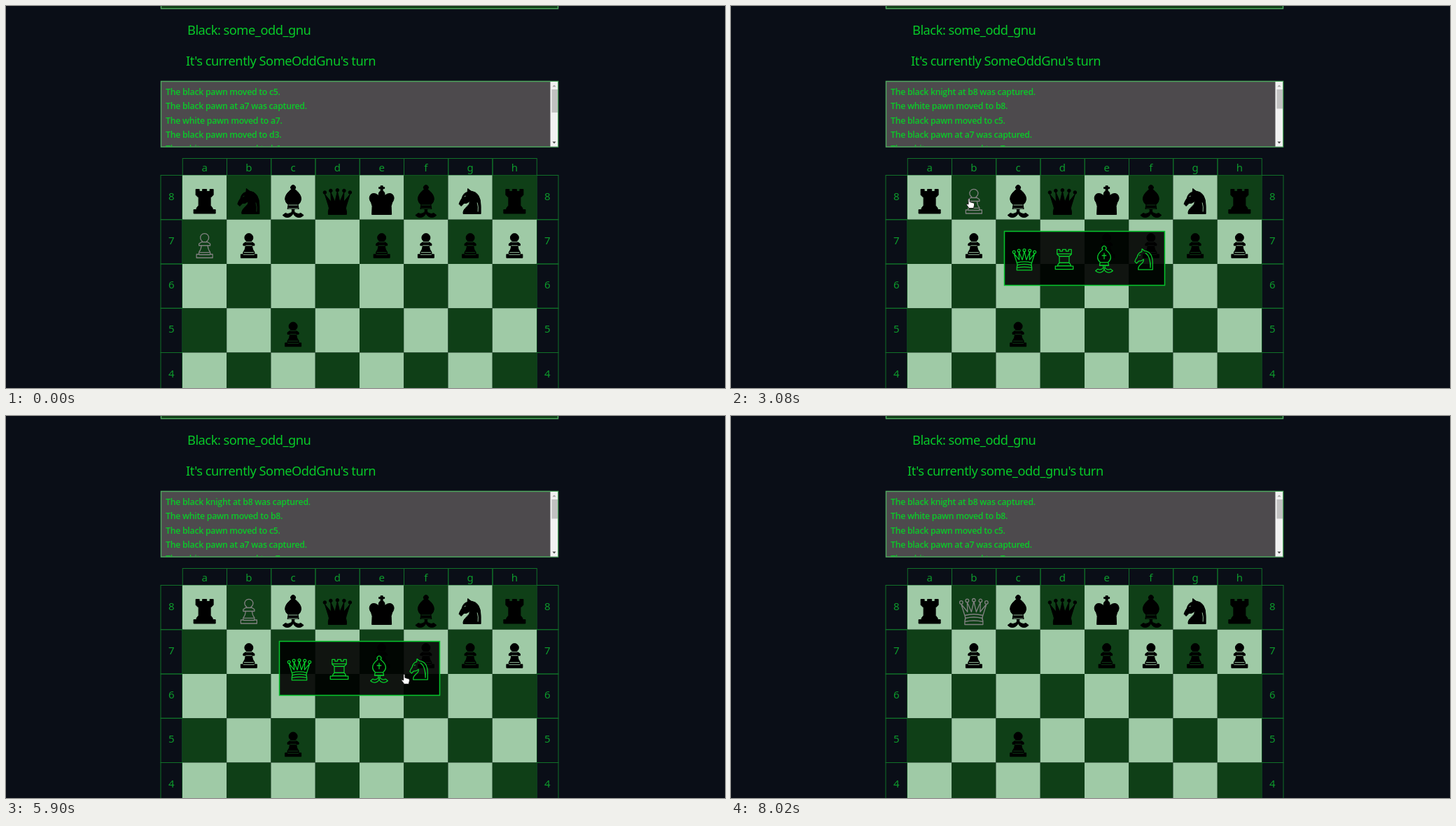
An HTML page for the animation above (8880 ms loop, 1027 px wide and 545 px high).

```html
<!DOCTYPE html>
<html lang="en">
<head>
<meta charset="utf-8">
<title>Pawn promotion</title>
<style>
html, body { margin: 0; width: 100%; height: 100%; overflow: hidden; background: #0a0e17; }
svg { display: block; }
text { font-family: "Noto Sans", "Open Sans", sans-serif; }
.title { font-size: 18.3px; letter-spacing: -.5px; fill: #08c928; }
.log { font: 600 12.3px "Open Sans", "Noto Sans", sans-serif; letter-spacing: -.27px; fill: #0acb28; }
.label { font-size: 15px; fill: #0d9a2c; text-anchor: middle; }
.cell { fill: none; stroke: #117029; }
.outline { fill: none; stroke-linejoin: round; }
.solid { stroke: #000; stroke-width: 1; stroke-linejoin: round; }
.cut { fill: none; stroke-width: .9; }
.cursor { fill: #fff; stroke: #111; stroke-width: .9; stroke-linejoin: round; }
</style>
</head>
<body>
<svg id="stage" width="1027" height="545" viewBox="0 0 1027 545"></svg>
<script>
const LOOP = 8880, SELECT = 1740, CAPTURE = 3080, PROMOTE = 6840;
const LEFT = 252, TOP = 241.5, SIZE = 63.25;
const LIGHT = "#9fcaa6", DARK = "#0f3f17";

// Each piece: silhouette, inner lines, extra lines for the outlined style.
// Origin: middle of the square's top edge.
const ball = (x, y) => `M${x - 2.3} ${y}a2.3 2.3 0 1 1 4.6 0a2.3 2.3 0 1 1 -4.6 0`;
const PIECES = {
  p: ["M-3 31A6 6 0 1 1 3 31L8 34.5V37H4.5Q5 43 8 46.5V49.5H11.5V54.5H-11.5V49.5H-8V46.5Q-5 43 -4.5 37H-8V34.5Z",
    "M-4.5 32H4.5M-4.5 37H4.5M-7 46.8H7M-8 50H8", ""],
  r: ["M-12.5 20h5v3h4.5v-3h6v3h4.5v-3h5v8l-4 4v11l3 4v2h4v5.5h-31v-5.5h4v-2l3 -4v-11l-4 -4z",
    "", "M-12.5 27.5H12.5M-8.5 32H8.5M-8.5 43H8.5M-11.5 48.5H11.5"],
  n: ["M-4 24L-3.5 19L1 22.5Q15 24 15 44V55H-10Q-11 50 -5 45Q0 41 -1 37Q-5 41 -9 40L-13 44L-16 41Q-15 37 -12 33Q-10 25 -4 24Z",
    "M-8.5 30.5l2 -1M10 39Q12 45 11 52", "M2 26Q11 30 11 52"],
  b: ["M-2.5 20A3.5 3.5 0 1 1 2.5 20Q11.5 27 11.5 34Q11 39 7 42L8 48H-8L-7 42Q-11 39 -11.5 34Q-11.5 27 -2.5 20Z" +
    "M-2 48Q0 52 -4 54Q-8 56 -11 54L-15 57Q-10 62 -4 59Q0 57 0 52Q0 57 4 59Q10 62 15 57L11 54Q8 56 4 54Q0 52 2 48Z",
    "M-6.5 42.5H6.5M-7 47.5H7", "M0 26V37M-4 30.5H4"],
  q: ["M-13 43L-18 27L-9 38L-9.5 24L-3.5 38L0 23L3.5 38L9.5 24L9 38L18 27L13 43Q11 47 13 51V56H-13V51Q-11 47 -13 43Z" +
    [[-18, 24.5], [-9.5, 22], [0, 21.3], [9.5, 22], [18, 24.5]].map(p => ball(...p)).join(""),
    "", "M-13 43Q0 39.5 13 43M-12 47Q0 44 12 47M-13 52Q0 49 13 52"],
  k: ["M-1.5 22V19H-4V17H-1.5V15H1.5V17H4V19H1.5V22Q5 24 4.5 29Q10 24 15 27Q20 32 15 39L13.5 44L14 56H-14L-13.5 44L-15 39Q-20 32 -15 27Q-10 24 -4.5 29Q-5 24 -1.5 22Z",
    "", "M-13 46Q0 42 13 46"]
};

const rect = (x, y, w, h, attrs) => `<rect x="${x}" y="${y}" width="${w}" height="${h}" ${attrs}/>`;
const text = (x, y, kind, words) => `<text x="${x}" y="${y}" class="${kind}">${words}</text>`;
const during = (from, to, content) => `<g data-from="${from}" data-to="${to}">${content}</g>`;
const colX = col => LEFT + col * SIZE;
const rowY = row => TOP + row * SIZE;
const shade = (col, row) => (col + row) % 2 ? DARK : LIGHT;

function outlined(kind, x, y, color, scale = 1) {
  return `<path class="outline" transform="translate(${x} ${y}) scale(${scale})" d="${PIECES[kind].join("")}" stroke="${color}" stroke-width="${1.3 / scale}"/>`;
}
function solid(kind, col, row) {
  const [shape, lines] = PIECES[kind];
  return `<g transform="translate(${colX(col + .5)} ${rowY(row)})"><path class="solid" d="${shape}"/>` +
    `<path class="cut" d="${lines}" stroke="${shade(col, row)}"/></g>`;
}
const white = (kind, col, row) => outlined(kind, colX(col + .5), rowY(row), "#808080");

function board() {
  let out = "";
  for (let col = 0; col < 8; col++) {
    out += rect(colX(col) + .25, 217.5, SIZE, 24, 'class="cell"') + text(colX(col + .5), 235.5, "label", "abcdefgh"[col]);
  }
  for (let row = 0; row < 5; row++) {
    for (const x of [221, 758]) {
      out += rect(x, rowY(row), 31, SIZE, 'class="cell"') + text(x + 15.3, rowY(row) + 35, "label", 8 - row);
    }
    for (let col = 0; col < 8; col++) {
      out += rect(colX(col), rowY(row), SIZE, SIZE, `fill="${shade(col, row)}"`);
    }
  }
  out += during(SELECT, CAPTURE, rect(colX(0), rowY(1), SIZE, SIZE, 'fill="#064f8e"'));
  [..."rnbqkbnr"].forEach((kind, col) => {
    const piece = solid(kind, col, 0);
    out += col === 1 ? during(0, CAPTURE, piece) : piece;
  });
  for (const col of [1, 4, 5, 6, 7]) out += solid("p", col, 1);
  return out + solid("p", 2, 3) +
    during(0, CAPTURE, white("p", 0, 1)) +
    during(CAPTURE, PROMOTE, white("p", 1, 0)) +
    during(PROMOTE, LOOP, white("q", 1, 0));
}

function log() {
  const entries = ["The black knight at b8 was captured.", "The white pawn moved to b8.", "The black pawn moved to c5.",
    "The black pawn at a7 was captured.", "The white pawn moved to a7.", "The black pawn moved to d3.", "The white pawn moved to b6."];
  const view = (first, thumb) => entries.slice(first, first + 5)
    .map((entry, i) => text(6, 19 + i * 20.25, "log", entry)).join("") +
    rect(557.5, 11, 8.5, thumb, 'fill="#c1c1c1"');
  return rect(221.5, 107.5, 567, 93.5, 'fill="#4d4a4d" stroke="#4fa75f" stroke-width="1.5"') +
    '<svg x="222" y="108" width="566" height="92.5">' + rect(555.5, 0, 11, 93, 'fill="#f1f1f1"') +
    during(0, CAPTURE, view(2, 33)) + during(CAPTURE, LOOP, view(0, 27.5)) +
    '<path d="M558.5 7.2l2.5 -2.7l2.5 2.7z" fill="#a3a3a3"/><path d="M558.5 85.5l2.5 2.7l2.5 -2.7z" fill="#404040"/></svg>';
}

function chooser() {
  return during(CAPTURE, PROMOTE,
    rect(390.5, 321.5, 229, 77, 'fill="#000" fill-opacity=".9" stroke="#06c52c" stroke-width="1.5"') +
    [..."qrbn"].map((kind, i) => outlined(kind, 419 + i * 57, 331, "#08c92a", .82)).join(""));
}

const stage = document.getElementById("stage");
stage.innerHTML =
  rect(221.5, -20, 567, 23.7, 'fill="#0f3f17" stroke="#4fa75f" stroke-width="1.5"') +
  text(259, 41, "title", "Black: some_odd_gnu") +
  during(0, PROMOTE, text(257, 84.5, "title", "It's currently SomeOddGnu's turn")) +
  during(PROMOTE, LOOP, text(252, 84.5, "title", "It's currently some_odd_gnu's turn")) +
  log() + board() + chooser() +
  '<path id="cursor" class="cursor"/>';

const ARROW = "M0 0V11.5L2.7 9L4.4 13L6.2 12.2L4.5 8.3H8Z";
const HAND = "M-1 1.2Q0 -.3 1.2 1.2V5.5L6.5 7Q8 7.5 7.6 10L6.5 14.5H0L-4 9Q-3.5 7.5 -1 9Z";
// Pointer route: time, x, y
const ROUTE = [[470, 952, 480], [590, 820, 385], [730, 560, 268], [800, 480, 255], [930, 371, 304], [1330, 300, 329],
  [1470, 291, 323], [1900, 291, 323], [2060, 320.5, 298], [2460, 340, 274], [4160, 340, 274], [4220, 346, 280],
  [4600, 400, 340], [5020, 446, 368], [5160, 448, 369], [5240, 448, 369], [5630, 610, 369], [5770, 610, 369],
  [6370, 421, 364], [7370, 421, 364], [7950, 969, 529], [8020, 969, 529]];

function pointer(t) {
  const i = ROUTE.findIndex(point => point[0] > t);
  if (i < 1) return null;
  const [t0, x0, y0] = ROUTE[i - 1], [t1, x1, y1] = ROUTE[i];
  const k = (t - t0) / (t1 - t0);
  return [x0 + (x1 - x0) * k, y0 + (y1 - y0) * k];
}
function clickable(t, x, y) {
  const inside = (left, top, w, h) => x >= left && x < left + w && y >= top && y < top + h;
  if (t >= PROMOTE) return false;
  return t < CAPTURE && inside(colX(0), rowY(1), SIZE, SIZE) ||
    t >= SELECT && inside(colX(1), rowY(0), SIZE, SIZE) ||
    t >= CAPTURE && inside(390, 321, 230, 78);
}

const cursor = document.getElementById("cursor");
const timed = [...stage.querySelectorAll("[data-from]")];
function draw() {
  const t = performance.now() % LOOP;
  for (const el of timed) el.style.display = t >= +el.dataset.from && t < +el.dataset.to ? "" : "none";
  const at = pointer(t);
  cursor.style.display = at ? "" : "none";
  if (at) {
    cursor.setAttribute("d", clickable(t, ...at) ? HAND : ARROW);
    cursor.setAttribute("transform", `translate(${at})`);
  }
  requestAnimationFrame(draw);
}
draw();
</script>
</body>
</html>
```
